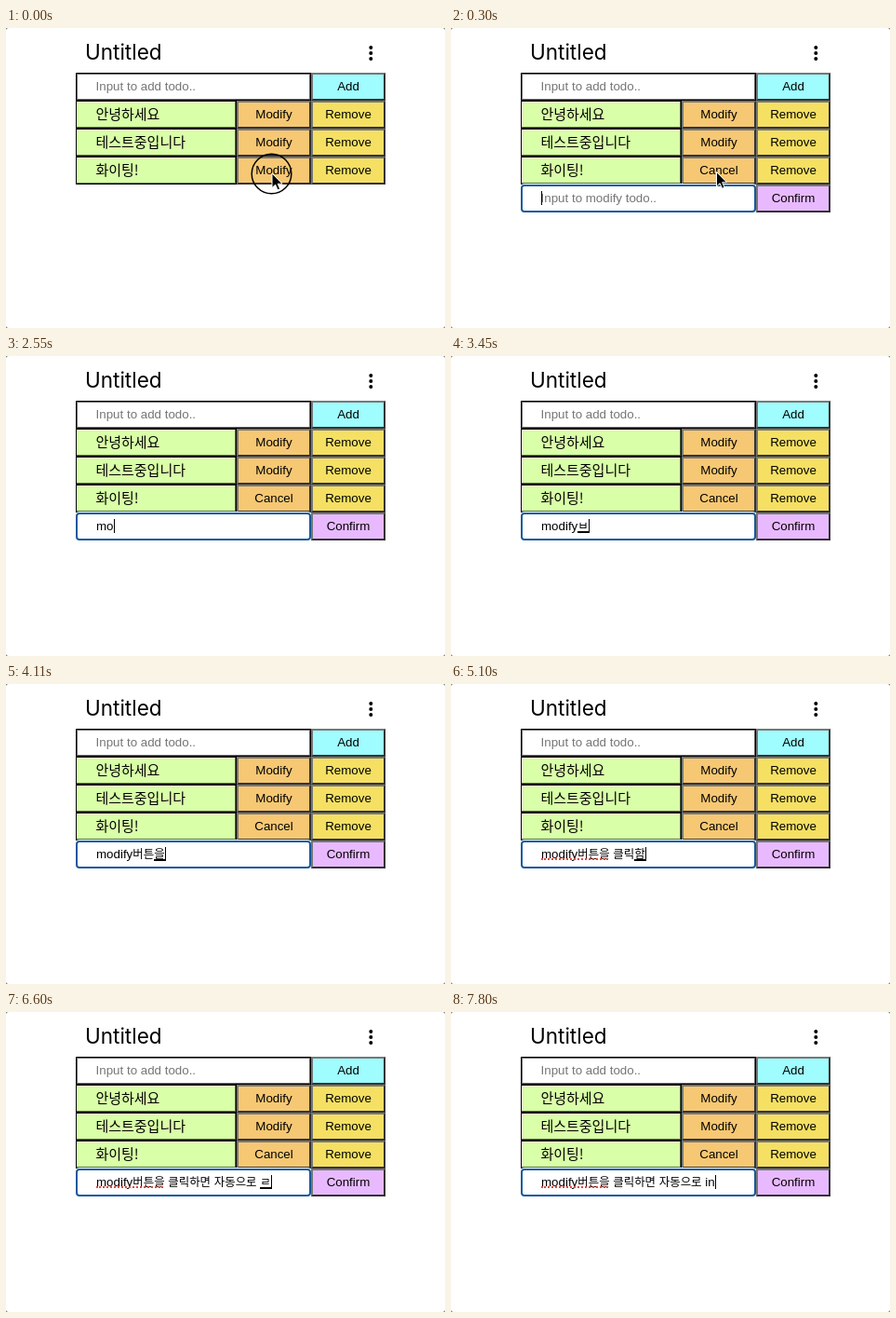
Animation of 472x322 px, one loop 8000 ms. Source, as an HTML page:

```html
<!DOCTYPE html>
<html lang="ko">
<head>
<meta charset="utf-8">
<style>
html, body { margin: 0; width: 100%; height: 100%; overflow: hidden; background: #777; }
#stage { position: relative; width: 472px; height: 322px; overflow: hidden; background: #fff; border-radius: 3px;
  font: 13.333px/26px "Liberation Sans", Arial, sans-serif; color: #000; }
#stage div, #stage svg { position: absolute; box-sizing: border-box; white-space: pre; }
#title { left: 85px; top: 11px; font: 22.5px/30px Inter, Roboto, sans-serif; }
.cell { height: 30px; border: 2px solid; }
.input { left: 75px; width: 253px; padding-left: 19.6px; background: #fff; color: #757575; }
.item { left: 75px; width: 173px; padding-left: 20.4px; background: #d9ffa8; border: 1px solid #000;
  box-shadow: inset -1px -1px #0009, inset 1px 1px #fff8;
  font: 15px/26px "Noto Sans CJK KR", "Noto Sans CJK", sans-serif; }
.button { width: 80px; text-align: center; border-color: #767676 #333 #333 #767676; }
#add { top: 48px; border: 1px solid #000; box-shadow: inset 0 0 0 1px #666; line-height: 28px; padding-left: 20.6px; }
#field { top: 168px; border-color: #18599d; border-radius: 4px; box-shadow: 0 0 0 1px #fff; }
#text { left: 97px; top: 170px; height: 26px; line-height: 26px; }
.ko { font-family: "Noto Sans CJK KR", "Noto Sans CJK", sans-serif; font-size: 12.45px; line-height: 0; }
#compose { height: 1.5px; top: 188px; background: #000; }
#caret { width: 1px; height: 15px; top: 175px; background: #000; }
#spelling { left: 97px; top: 187px; width: 72px; height: 2px; border-top: 2px dotted #e4473f; }
</style>
</head>
<body>
<div id="stage"></div>
<script>
const stage = document.getElementById('stage');
const $ = id => document.getElementById(id);

const button = (x, y, color, label, id = '') =>
  `<div class="cell button" id="${id}" style="left:${x}px;top:${y}px;background:${color}">${label}</div>`;
const todos = ['안녕하세요', '테스트중입니다', '화이팅!'];

stage.innerHTML = `
  <div id="title">Untitled</div>
  <svg width="472" height="48">${[21, 27, 33].map(y => `<circle cx="392.3" cy="${y}" r="2"/>`).join('')}</svg>
  <div class="cell input" id="add">Input to add todo..</div>
  ${button(328, 48, '#9ffdff', 'Add')}
  ${todos.map((todo, i) => {
    const y = 78 + 30 * i;
    return `<div class="cell item" style="top:${y}px">${todo}</div>`
      + button(248, y, '#f7c873', 'Modify', 'modify' + i)
      + button(328, y, '#f5e063', 'Remove');
  }).join('')}
  <div id="editor">
    <div class="cell input" id="field"></div>
    ${button(328, 168, '#e8b9ff', 'Confirm')}
    <div id="text"></div><div id="spelling"></div><div id="compose"></div><div id="caret"></div>
  </div>
  <svg width="472" height="322">
    <circle id="ring" cx="285.5" cy="156.5" r="21.3" fill="none" stroke="#000" stroke-width="1.5"/>
    <path id="pointer" d="M0 0V15.5L3.6 12.2L6 17.8L8.6 16.7L6.2 11.2H11Z" stroke="#fff" stroke-linejoin="round"/>
  </svg>`;

// [time, committed text, syllable still being composed]
const word = 'modify', object = 'modify버튼을 ', verb = object + '클릭하면 ', full = verb + '자동으로 ';
const typing = [
  [0, ''], [2340, 'm'], [2550, 'mo'], [2760, 'mod'], [2850, 'modi'], [2940, 'modif'], [3030, word],
  [3450, word, 'ㅂ'], [3510, word, '버'], [3600, word, '벝'], [3690, word + '버', '트'],
  [3780, word + '버', '튼'], [3870, word + '버튼', 'ㅇ'], [4020, word + '버튼', '으'],
  [4110, word + '버튼', '을'], [4230, object],
  [4410, object, 'ㅋ'], [4440, object, '크'], [4470, object, '클'],
  [4620, object + '클', 'ㄹ'], [4710, object + '클', '리'], [4770, object + '클', '릭'],
  [4920, object + '클릭', 'ㅎ'], [5010, object + '클릭', '하'], [5100, object + '클릭', '함'],
  [5190, object + '클릭하', '며'], [5220, object + '클릭하', '면'], [5280, verb],
  [5460, verb, 'ㅈ'], [5550, verb, '자'], [5640, verb, '잗'], [5700, verb + '자', '도'],
  [5790, verb + '자', '동'], [5850, verb + '자동', 'ㅇ'], [5940, verb + '자동', '으'],
  [6030, verb + '자동', '을'], [6090, verb + '자동으', '로'], [6180, full],
  [6600, full, 'ㄹ'], [7290, full], [7590, full + 'i'], [7800, full + 'in']
];
const caretOff = [[0, 60], [540, 960], [1410, 1890], [7080, 7290]];

const show = (id, visible) => { $(id).style.visibility = visible ? 'visible' : 'hidden'; };
const markup = text => text.replace(/[ㄱ-힣]+/g, '<span class="ko">$&</span>');
function setText(text) {
  $('text').innerHTML = markup(text);
  return $('text').getBoundingClientRect().width;
}

function draw(t) {
  const open = t >= 30;
  $('editor').style.display = open ? 'block' : 'none';
  $('modify2').textContent = open ? 'Cancel' : 'Modify';
  $('ring').style.opacity = t < 30 ? 1 : t < 60 ? 0.6 : t < 90 ? 0.25 : 0;

  show('pointer', t < 2340);
  const [x, y] = t < 300 ? [286, 156] : t < 330 ? [285.5, 154.5] : [285, 153];
  $('pointer').setAttribute('transform', `translate(${x} ${y})`);

  const [, committed, composing = ''] = typing.findLast(step => step[0] <= t);
  $('field').textContent = committed ? '' : 'Input to modify todo..';
  const start = 97 + setText(committed);
  const end = 97 + setText(committed + composing);
  $('compose').style.left = start + 'px';
  $('compose').style.width = end - start + 'px';
  $('caret').style.left = Math.round(end) + 'px';
  show('caret', open && !caretOff.some(([from, to]) => t >= from && t < to));
  show('spelling', t >= 4230);
}

const began = performance.now();
function tick() {
  draw((performance.now() - began) % 8000);
  requestAnimationFrame(tick);
}
draw(0);
requestAnimationFrame(tick);
</script>
</body>
</html>
```
